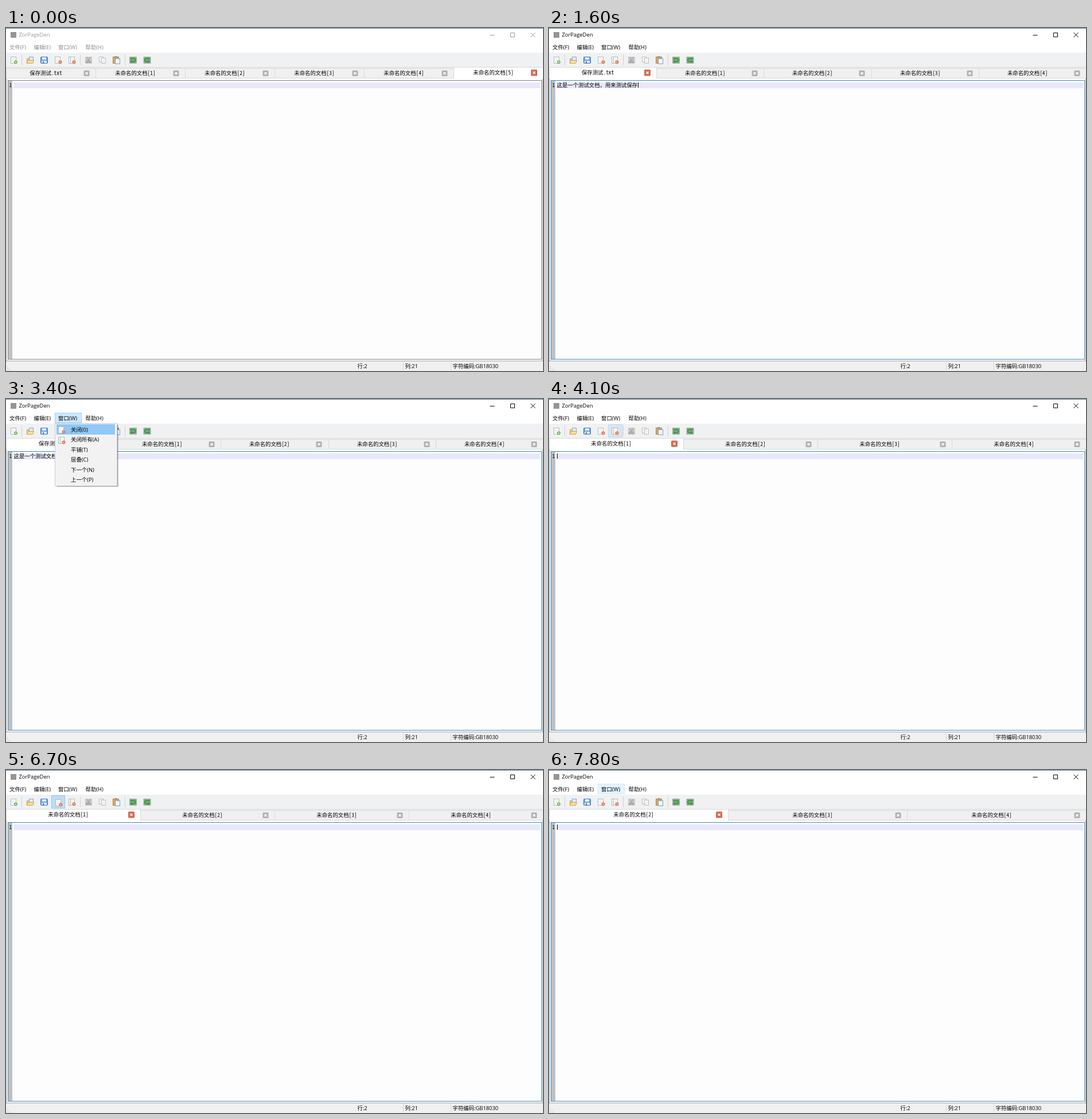
An HTML page that plays this animation: 936x598 px, repeating every 8 s.

```html
<!DOCTYPE html>
<html lang="zh-CN">
<head>
<meta charset="utf-8">
<title>ZorPageDen</title>
<style>
html, body { margin: 0; width: 100%; height: 100%; overflow: hidden; background: #fff; }
svg { display: block; width: 936px; height: 598px; }
text { font: 9.4px "Open Sans", "Noto Sans CJK SC", "Noto Sans CJK", sans-serif; white-space: pre; }
.mono { font-family: "Noto Sans Mono CJK SC", "Noto Sans CJK SC", "Noto Sans CJK", "Liberation Mono", monospace; }
.mid { text-anchor: middle; }
</style>
</head>
<body>
<svg id="stage" viewBox="0 0 936 598" xmlns="http://www.w3.org/2000/svg"></svg>
<script>
const LOOP = 8000, WIDTH = 936;
const doc = n => `未命名的文档[${n}]`;
const allTabs = ['保存测试.txt', ...[1, 2, 3, 4, 5].map(doc)];

// Each step changes only the named parts of the window.
const steps = [
  [0, { active: false, from: 0, to: 6, selected: 5, text: '', caret: false,
        closeHover: false, tabHover: -1, menuHover: -1, tool: -1, pressed: false, popup: 0, item: false }],
  [500, { closeHover: true }],
  [1200, { active: true }],
  [1300, { to: 5, selected: 0, closeHover: false, text: '这是一个测试文档\uff0c用来测试保存', caret: true, tabHover: 4 }],
  [1600, { tabHover: -1 }],
  [1800, { caret: false }],
  [1900, { menuHover: 3 }],
  [2100, { menuHover: 2 }],
  [2200, { caret: true }],
  [2700, { caret: false, popup: .65 }],
  [2800, { popup: 1 }],
  [3400, { item: true }],
  [4100, { popup: 0, item: false, menuHover: -1, from: 1, text: '', caret: true, tool: 4 }],
  [4600, { caret: false, tool: -1 }],
  [4700, { menuHover: 3 }],
  [5000, { caret: true }],
  [5500, { caret: false }],
  [5700, { menuHover: -1 }],
  [5800, { tool: 4 }],
  [6000, { caret: true, tool: 3 }],
  [6500, { caret: false }],
  [6700, { pressed: true }],
  [6800, { pressed: false, from: 2, caret: true }],
  [7300, { caret: false }],
  [7400, { tool: 4 }],
  [7600, { tool: -1, menuHover: 3 }],
  [7700, { menuHover: 2 }],
  [7800, { caret: true }]
];
let last = {};
const states = steps.map(([at, change]) => ({ at, ...(last = { ...last, ...change }) }));

const rect = (x, y, w, h, fill, more = '') => `<rect x="${x}" y="${y}" width="${w}" height="${h}" fill="${fill}" ${more}/>`;
const box = (x, y, w, h, fill, stroke, more = '') => rect(x + .5, y + .5, w - 1, h - 1, fill, `stroke="${stroke}" ${more}`);
const path = (d, stroke, fill = 'none', width = 1) => `<path d="${d}" stroke="${stroke}" fill="${fill}" stroke-width="${width}"/>`;
const label = (x, y, s, fill = '#000', cls = '') => `<text x="${x}" y="${y + 3.4}" fill="${fill}" class="${cls}">${s}</text>`;
const at = (x, y, s) => `<g transform="translate(${x} ${y})">${s}</g>`;

// Icons are drawn around their own centre.
const page = (x, y, w = 9, h = 12, line = '#b4b8be') =>
  box(x, y, w, h, '#fafafa', line) + path(`M${x + 2} ${y + 4.5}h${w - 4}m0 3h${4 - w}`, '#dde0e4');
const badge = `<circle cx="3.5" cy="3.5" r="3" fill="#e0743f"/>` + path('M2.2 2.2l2.6 2.6m0 -2.6l-2.6 2.6', '#fbe3d8');
const closeDoc = page(-6, -6, 10) + badge;
const closeAll = page(-6, -6, 8) + page(-3, -6, 8) + badge;
const turnArrow = rect(-6.5, -6, 13, 12, '#a3aaa4', 'rx="1"') + rect(-5.5, -5, 11, 10, '#8fae92') +
  path('M-5 -2.5H1.5Q4 -2.5 4 0T1.5 2.5H-2', '#3f9a48', 'none', 2.4) + path('M-1.5 -.8v6.4L-5.5 2.5z', 'none', '#3f9a48');
const icons = [
  [13, page(-5, -6, 10) + `<circle cx="4" cy="3.5" r="2.8" fill="#56a743"/>` + path('M2.5 3.5h3M4 2v3', '#fff')],
  [42, path('M-5.5 5.5v-8h4l1 1h5v7z', '#cfa64e', '#f0cd78') + box(-2, -6, 8, 8, '#dcecfb', '#7fabd8') +
       path('M-6 5.5L-3.5 .5H6.5L4.5 5.5z', '#cfa44a', '#fbe09a')],
  [66, box(-6, -6, 13, 12, '#6aa2e6', '#3f76c0', 'rx="1"') + rect(-3, -5, 7, 4, '#eaf3fd') + rect(-4, 1, 9, 4, '#dce8f6') + rect(-2, 2, 2, 3, '#4a7dbd')],
  [91, closeDoc],
  [115, closeAll],
  [143, rect(-5, -6, 12, 12, '#cbcbcb') + path('M-2 -5L2 2M4 -5L-1 2', '#a6a6a6', 'none', 1.3) +
        '<g fill="none" stroke="#9c9c9c" stroke-width="1.2"><circle cx="-2" cy="3" r="1.7"/><circle cx="3" cy="3" r="1.7"/></g>'],
  [168, page(-6, -6, 8, 10, '#bdbdbd') + page(-2, -4, 8, 10, '#bdbdbd')],
  [192, box(-6, -6, 11, 12, '#dba85c', '#b5843f') + rect(-3, -7, 5, 3, '#9a9ca1') + box(-2, -3, 9, 10, '#eef5fd', '#7f9fc4')],
  [221, `<g transform="translate(.5 0)">${turnArrow}</g>`],
  [246, `<g transform="scale(-1 1)">${turnArrow}</g>`]
];
const toolLeft = [1, 30, 54, 79, 103];

const menus = [[6, '文件(F)'], [48.5, '编辑(E)'], [91, '窗口(W)'], [138.5, '帮助(H)']];
const menuBox = [[0, 42], [42, 43], [85, 47], [132, 45]];
const popupItems = ['关闭(0)', '关闭所有(A)', '平铺(T)', '层叠(C)', '下一个(N)', '上一个(P)'];

function titleBar(s) {
  const ink = s.active ? '#000' : '#999';
  return rect(0, 0, WIDTH, 43, '#fff') + rect(0, 0, WIDTH, 1, '#557f92') +
    rect(8, 7, 10, 10, '#99948f') +
    `<g style="font-size:9.6px">${label(22.5, 12, 'ZorPageDen', ink)}</g>` +
    path('M843.5 12.5h8M879.5 8.5h7v7h-7zM914.5 8l8 8m0 -8l-8 8', ink);
}

function menuBar(s) {
  const open = s.popup > 0;
  let out = '';
  if (s.menuHover >= 0) {
    const [x, w] = menuBox[s.menuHover];
    out += box(x, 24, w, 18, open ? '#cce8ff' : '#e5f3ff', open ? '#99d1ff' : '#cce8ff');
  }
  return out + menus.map(([x, name]) => label(x, 33.5, name, s.active ? '#000' : '#8c8c8c')).join('');
}

function toolBar(s) {
  let out = rect(0, 43, WIDTH, 26, '#f0f1f2') + path('M27.5 46v19M129.5 46v19M207.5 46v19', '#cfd1d3') +
    rect(0, 68, WIDTH, 1, '#dadada');
  if (s.tool >= 0) {
    out += box(toolLeft[s.tool], 44, s.tool === 4 ? 25 : 24, 23, s.pressed ? '#c0dcf3' : '#d8e6f2', s.pressed ? '#90c8f6' : '#c0dcf3');
  }
  const shift = i => s.pressed && s.tool === i ? 1 : 0;
  return out + icons.map(([x, icon], i) => at(x + shift(i), 56 + shift(i), icon)).join('');
}

function tabBar(s) {
  const tabs = allTabs.slice(s.from, s.to), w = WIDTH / tabs.length;
  const draw = (name, i) => {
    const on = i === s.selected, x = Math.round(i * w), width = Math.round((i + 1) * w) - x;
    const y = on ? 78 : 79, cx = Math.round(x + w - 16.5);
    const fill = on ? '#fff' : i === s.tabHover ? '#d8eaf9' : '#f0f0f0';
    const red = s.closeHover ? '#ee7857' : '#d9674b';
    const half = on ? 5.5 : 5;
    return box(x, on ? 68 : 70, width + 1, on ? 20 : 18, fill, '#d9d9d9') +
      (on ? rect(x + 1, 86, width - 1, 3, '#fff') : '') +
      label(x + w / 2 - 8.5, y, name, '#000', 'mono mid') +
      at(cx + .5, y, rect(-half, -half, 2 * half, 2 * half, on ? red : '#b1b1b1', 'rx="1.5"') +
        path('M-2 -2L2 2M2 -2L-2 2', '#fff', 'none', 1.5));
  };
  return rect(0, 69, WIDTH, 19, '#f0f0f0') + rect(0, 87, WIDTH, 1, '#bcbcbc') + tabs.map(draw).join('');
}

function editor(s) {
  const line = s.active ? '#3f8cc4' : '#858585';
  return box(0, 87, WIDTH, 494, '#fdfdfd', '#a5a5a5') +
    box(3, 91, 931, 487, '#fdfdfd', line) +
    rect(4, 92, 7, 485, '#c0c0c0') + rect(13, 95, 918, 10, '#e8e7fc') +
    label(5.5, 99.5, '1', '#000', 'mono') +
    label(13.5, 99.5, s.text, '#000', 'mono') +
    (s.caret ? rect(s.text ? 155 : 14, 95, 1, 9, '#000') : '');
}

function statusBar() {
  const grip = [[2, 590], [2, 593], [2, 596], [5, 593], [5, 596], [8, 596]];
  return rect(0, 581, WIDTH, 17, '#f0f0f0') + path('M692.5 582v15M775.5 582v15', '#d9d9d9') +
    grip.map(([x, y]) => rect(x, y, 1, 1, '#aaa')).join('') +
    label(612.5, 590, '行:2') + label(695.5, 590, '列:21') + label(778.5, 590, '字符编码:GB18030');
}

function popup(s) {
  if (!s.popup) return '';
  const rows = popupItems.map((name, i) => label(113, 53.3 + 17.5 * i, name)).join('');
  return `<g opacity="${s.popup}">` + rect(89, 45, 107, 108, '#000', 'opacity=".18"') + rect(88, 44, 107, 109, '#000', 'opacity=".2"') +
    box(85, 42, 109, 110, '#f2f2f2', '#cccccc') +
    (s.item ? rect(88, 44, 102, 18, '#90c8f6') : '') +
    at(97, 54, closeDoc) + at(97, 72, closeAll) + rows + '</g>';
}

const stage = document.getElementById('stage');
let shown = null;
function frame() {
  const t = performance.now() % LOOP;
  const state = states.findLast(s => s.at <= t);
  if (state !== shown) {
    shown = state;
    stage.innerHTML = [titleBar, menuBar, toolBar, editor, tabBar, statusBar, popup].map(part => part(state)).join('');
  }
  requestAnimationFrame(frame);
}
frame();
</script>
</body>
</html>
```
